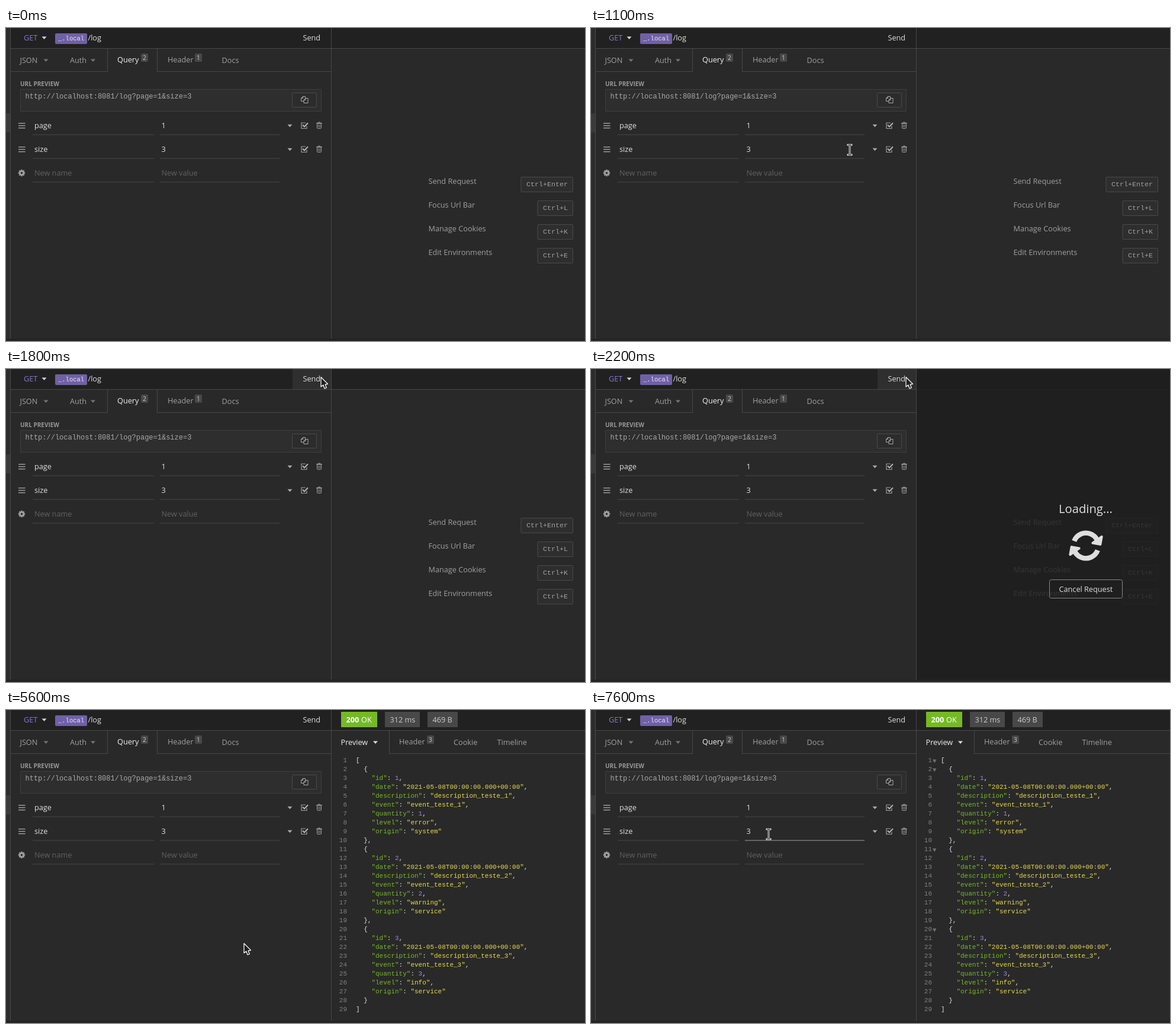
An HTML page with a canvas that plays this animation: 978 px wide and 528 px high, repeating every 8 s.

```html
<!DOCTYPE html>
<html lang="en">
<head>
<meta charset="utf-8">
<title>API client</title>
<style>
html, body { margin: 0; width: 100%; height: 100%; overflow: hidden; background: #292929; }
canvas { display: block; width: 978px; height: 528px; }
</style>
</head>
<body>
<canvas id="stage" width="978" height="528"></canvas>
<script>
const ctx = document.getElementById('stage').getContext('2d');
const LOOP = 8000;
const UI = '"Open Sans", "Noto Sans", sans-serif';
const MONO = '"Liberation Mono", monospace';
const BG = '#292929', BAR = '#212121', LINE = '#484848';
const GREEN = '#75ba24', YELLOW = '#e6d94a', PURPLE = '#9a84ee', TEXT = '#e0e0e0';

// Pointer stops: time, x, y, shape
const STOPS = [
  [700, 110, 4, 'arrow'], [800, 150, 70, 'arrow'], [900, 232, 132, 'arrow'],
  [1000, 340, 168, 'beam'], [1100, 437, 205.5, 'beam'], [1200, 522, 168, 'arrow'],
  [1300, 584, 98, 'arrow'], [1400, 580, 38, 'arrow'], [1500, 548, 2, 'arrow'],
  [1600, 542, 5, 'arrow'], [1700, 536, 10, 'arrow'], [1800, 531.5, 13, 'arrow'],
  [2300, 531, 15, 'arrow'], [2400, 530, 18, 'arrow'], [2500, 528.5, 20, 'arrow'],
  [5600, 401.5, 393, 'arrow'], [6200, 396.5, 393, 'arrow'],
  [6500, 315.5, 242.5, 'beam'], [6900, 300, 209.5, 'beam']
];

const LOGS = [['error', 'system'], ['warning', 'service'], ['info', 'service']];
const CODE = JSON.stringify(LOGS.map(([level, origin], i) => ({
  id: i + 1,
  date: '2021-05-08T00:00:00.000+00:00',
  description: 'description_teste_' + (i + 1),
  event: 'event_teste_' + (i + 1),
  quantity: i + 1,
  level,
  origin
})), null, 2).split('\n');

function rect(x, y, w, h, fill) {
  ctx.fillStyle = fill;
  ctx.fillRect(x, y, w, h);
}

function box(x, y, w, h, fill, stroke, r = 0) {
  ctx.beginPath();
  ctx.roundRect(x, y, w, h, r);
  if (fill) { ctx.fillStyle = fill; ctx.fill(); }
  if (stroke) { ctx.strokeStyle = stroke; ctx.lineWidth = 1; ctx.stroke(); }
}

function text(s, x, y, color = TEXT, size = 12.7, family = UI, weight = 400) {
  ctx.font = `${weight} ${size}px ${family}`;
  ctx.fillStyle = color;
  ctx.fillText(s, x, y);
}

const mono = (s, x, y, color, size) => text(s, x, y, color, size, MONO);

function path(points, close) {
  ctx.beginPath();
  points.forEach(([x, y]) => ctx.lineTo(x, y));
  if (close) ctx.closePath();
}

function stroke(color, width = 1.2) {
  ctx.strokeStyle = color;
  ctx.lineWidth = width;
  ctx.stroke();
}

function caret(x, y, color, w = 8, h = 4.5) {
  path([[x, y], [x + w, y], [x + w / 2, y + h]], true);
  ctx.fillStyle = color;
  ctx.fill();
}

function badge(n, x) {
  box(x, 43, 12, 14, '#484848', null, 2);
  text(n, x + 3, 54, '#cccccc', 10.2);
}

function checkIcon(x, y) {
  path([[x + 8, y + 1.5], [x + 1, y + 1.5], [x + 1, y + 11], [x + 10, y + 11], [x + 10, y + 7]]);
  stroke('#a0a0a0');
  path([[x + 3, y + 5], [x + 6, y + 8], [x + 12, y + 1.8]]);
  stroke('#b4b4b4', 2);
}

function trashIcon(x, y) {
  rect(x, y + 1.5, 10, 1.2, '#a0a0a0');
  path([[x + 3, y + 2], [x + 3.5, y + .5], [x + 6.5, y + .5], [x + 7, y + 2]]);
  stroke('#a0a0a0', 1);
  box(x + 1.5, y + 2.5, 7, 8.5, null, '#a0a0a0', 1);
  for (const d of [3, 4.7, 6.4]) rect(x + d, y + 4.5, .8, 5, '#8c8c8c');
}

function copyIcon(x, y) {
  const page = (px, py) => {
    path([[px + 3, py], [px + 7, py], [px + 7, py + 8], [px, py + 8], [px, py + 3]], true);
    ctx.fillStyle = '#2c2c2c';
    ctx.fill();
    stroke('#aaaaaa', 1);
    path([[px, py + 3], [px + 3, py + 3], [px + 3, py]]);
    stroke('#aaaaaa', 1);
  };
  page(x, y);
  page(x + 4.5, y + 3);
}

function gearIcon(x, y) {
  ctx.save();
  ctx.translate(x, y);
  for (let i = 0; i < 8; i++) {
    rect(-1.3, -5.7, 2.6, 3, '#a0a0a0');
    ctx.rotate(Math.PI / 4);
  }
  ctx.beginPath();
  ctx.arc(0, 0, 3, 0, 7);
  stroke('#a0a0a0', 2.6);
  ctx.restore();
}

function row(y, name, value, isNew, focus) {
  const color = isNew ? '#626262' : TEXT;
  text(name, 48, y + 4.5, color);
  text(value, 262.5, y + 4.5, color);
  rect(45, y + 15, 205, 1, LINE);
  rect(260, y + 15, 202, 1, focus ? '#a0a0a0' : LINE);
  if (isNew) {
    gearIcon(26.5, y);
    return;
  }
  for (const d of [-4, 0, 4]) rect(21, y + d - .5, 11.5, 1.4, '#a0a0a0');
  caret(475.5, y - 1.8, '#aaaaaa');
  checkIcon(498, y - 6);
  trashIcon(524, y - 6);
}

function requestPane(hover, focus) {
  rect(0, 0, 7, 528, '#2c2c2c');
  rect(0, 144, 7, 32, '#3a3a3a');
  rect(8, 0, 541, 34, BAR);
  if (hover) rect(484, 0, 65, 34, '#2f2f2f');
  rect(8, 34, 541, 1, LINE);
  text('GET', 30, 21, '#8a78d6');
  caret(60.5, 14.5, '#d8d8d8');
  box(83, 9, 54, 18, '#6f61a6', null, 2);
  mono('_.local', 88, 21, '#eae6f6', 10.5);
  text('/log', 138.5, 21);
  text('Send', 501.5, 21);

  text('JSON', 23.5, 59, '#a0a0a0');
  caret(63.5, 52.5, '#747474');
  text('Auth', 108, 59, '#a0a0a0');
  caret(143, 52.5, '#747474');
  text('Query', 188, 58, '#f0f0f0');
  badge('2', 228);
  text('Header', 273, 58, '#a0a0a0');
  badge('1', 319);
  text('Docs', 364.5, 59, '#a0a0a0');
  rect(8, 73, 164, 1, LINE);
  rect(255, 73, 294, 1, LINE);
  rect(171, 35, 1, 39, LINE);
  rect(255, 35, 1, 39, LINE);

  text('URL PREVIEW', 24, 98, '#989898', 10, UI, 700);
  box(24.5, 103.5, 508, 37, '#2e2e2e', '#3e3e3e');
  mono('http://localhost:8081/log?page=1&size=3', 32.5, 119, '#a8a8a8', 12);
  box(483.5, 109.5, 41, 24, '#2c2c2c', '#4a4a4a', 1);
  copyIcon(498.5, 115.5);

  row(164.5, 'page', '1');
  row(204.5, 'size', '3', false, focus);
  row(244.5, 'New name', 'New value', true);
}

function emptyPane() {
  const hints = [['Send Request', 'Enter'], ['Focus Url Bar', 'L'],
    ['Manage Cookies', 'K'], ['Edit Environments', 'E']];
  hints.forEach(([label, key], i) => {
    const y = 251.5 + i * 40;
    const w = key.length * 7 + 52.5;
    text(label, 713.5, y + 11.5, '#a0a0a0');
    box(957.5 - w, y, w, 25, '#2e2e2e', '#4a4a4a', 1);
    mono('Ctrl+' + key, 966.5 - w, y + 15.5, '#a0a0a0', 11.7);
  });
}

function spinner(x, y, angle) {
  ctx.save();
  ctx.translate(x, y);
  ctx.rotate(angle);
  ctx.fillStyle = '#dedede';
  ctx.lineJoin = 'round';
  for (let i = 0; i < 2; i++) {
    ctx.beginPath();
    ctx.arc(0, 0, 21.3, Math.PI + .2, Math.PI * 2 - .65);
    stroke('#dedede', 8.4);
    path([[23.6, -19.5], [23.6, -6.3], [10.4, -6.3]], true);
    ctx.fill();
    stroke('#dedede', 4);
    ctx.rotate(Math.PI);
  }
  ctx.restore();
}

function loading(t) {
  rect(550, 0, 428, 524, 'rgba(30,30,30,.82)');
  text('Loading...', 790, 243, TEXT, 20.2);
  const spin = Math.min(Math.floor(t / 100) * 100, 2500) - 2200;
  spinner(836, 298, (10 + spin * .18) * Math.PI / 180);
  box(774.5, 355.5, 123, 31, null, '#888888', 3);
  text('Cancel Request', 790.5, 376, TEXT);
}

function codeLine(line, y) {
  let x = 591;
  for (const part of line.match(/"[^"]*"|\d+|[^"\d]+/g)) {
    const end = x + part.length * 6.6;
    const isKey = part[0] === '"' && line.includes(part + ':');
    const color = isKey ? GREEN : part[0] === '"' ? YELLOW : /\d/.test(part) ? PURPLE : TEXT;
    mono(part, x, y, color, 11);
    x = end;
  }
}

function responsePane(folds) {
  rect(566, 3, 61, 26, GREEN);
  text('200', 574.5, 21, '#ffffff', 12.7, UI, 700);
  text('OK', 600, 21, '#ffffff');
  rect(640, 3, 59, 26, '#484848');
  text('312 ms', 648.5, 21, '#cccccc');
  rect(712, 3, 51, 26, '#484848');
  text('469 B', 720.5, 21, '#cccccc');

  text('Preview', 565.5, 59, '#f0f0f0');
  caret(620, 52.5, '#e0e0e0');
  text('Header', 664, 58, '#a0a0a0');
  badge('3', 711);
  text('Cookie', 756, 59, '#a0a0a0');
  text('Timeline', 829.5, 59, '#a0a0a0');
  rect(647, 35, 1, 39, LINE);
  rect(647, 73, 331, 1, LINE);

  CODE.forEach((line, i) => {
    const y = 88 + i * 15;
    const n = String(i + 1);
    mono(n, 576 - n.length * 6.6, y, '#808080', 11);
    codeLine(line, y);
    if (folds && /[[{]$/.test(line)) caret(577, y - 4.5, '#707070', 6.5, 6);
  });
}

function pointer(x, y, shape) {
  ctx.save();
  ctx.translate(x, y);
  ctx.lineJoin = 'round';
  if (shape === 'beam') {
    const beam = () => {
      ctx.beginPath();
      for (const s of [-1, 1]) {
        ctx.moveTo(-3, s * 8.3);
        ctx.lineTo(3, s * 8.3);
      }
      ctx.moveTo(0, -8.3);
      ctx.lineTo(0, 8.3);
    };
    beam();
    ctx.lineCap = 'square';
    stroke('#f4f4f4', 2.8);
    beam();
    ctx.lineCap = 'butt';
    stroke('#111111', 1);
  } else {
    path([[.5, .7], [.5, 17], [4.3, 14], [6.6, 20], [9.8, 18.7], [7.6, 13], [12, 12.3]], true);
    ctx.fillStyle = '#202020';
    ctx.fill();
    stroke('#f4f4f4', 1.3);
  }
  ctx.restore();
}

function draw(t) {
  const done = t >= 5600;
  const focus = t >= 7300;
  rect(0, 0, 978, 528, BG);
  requestPane(t >= 1500 && !done, focus);
  rect(550, 0, 428, 34, BAR);
  rect(550, 34, 428, 1, LINE);
  if (done) responsePane(t >= 5900);
  else emptyPane();
  if (t >= 2200 && !done) loading(t);
  rect(7, 0, 1, 524, LINE);
  rect(549, 0, 1, 524, LINE);
  rect(0, 524, 978, 4, '#242424');
  if (focus && t < 7600) rect(270, 194, 1, 18, TEXT);
  const stop = STOPS.findLast(s => s[0] <= t);
  if (stop) pointer(...stop.slice(1));
}

function tick() {
  draw(performance.now() % LOOP);
  requestAnimationFrame(tick);
}
tick();
</script>
</body>
</html>
```
